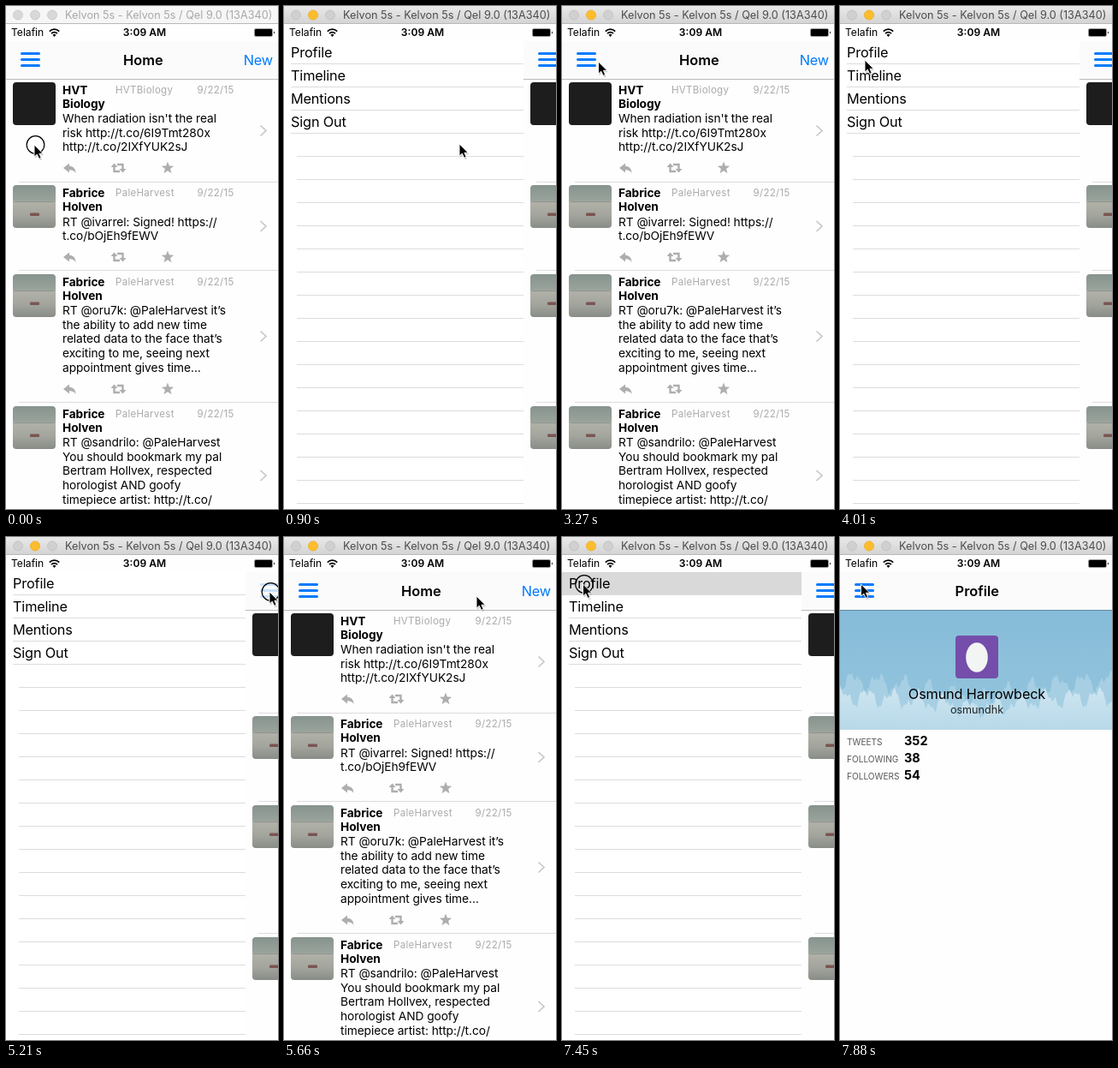
An HTML page for the animation above (8000 ms loop, 318 by 587 pixels).

```html
<!DOCTYPE html>
<html lang="en">
<head>
<meta charset="utf-8">
<title>Drawer menu demo</title>
<style>
html, body { margin: 0; height: 100%; overflow: hidden; background: #fff; }
svg { display: block; width: 100%; height: 100%; font-family: Inter, sans-serif; }
.window { font-size: 12.68px; }
.status { font-size: 12.1px; }
.large { font-size: 16.3px; letter-spacing: -.01em; }
.heading { font-size: 16.4px; font-weight: 600; }
.body { font-size: 13.75px; letter-spacing: -.005em; }
.name { font-size: 13.7px; font-weight: 700; letter-spacing: -.005em; }
.meta { font-size: 11.5px; letter-spacing: .025em; fill: #aaa; }
.handle { font-size: 12.6px; fill: #222; }
.label { font-size: 10.1px; fill: #555; }
.value { font-size: 14.5px; font-weight: 700; }
.rule { stroke: #dcdcdf; }
.bar { fill: url(#chrome); }
.window { fill: #4c4c4c; }
.dot { fill: #d0d0d0; stroke: #c4c4c4; }
.middle { fill: #fdbd2f; stroke: #f0b22c; }
.inactive .bar { fill: #f6f6f6; }
.inactive .window { fill: #a8a8a8; }
.inactive .dot { fill: #d8d8d8; stroke: #cdcdcd; }
</style>
</head>
<body>
<svg viewBox="0 0 318 587">
  <defs>
    <linearGradient id="chrome" x2="0" y2="1">
      <stop stop-color="#e9e9e9"/><stop offset="1" stop-color="#d3d3d3"/>
    </linearGradient>
    <linearGradient id="photoTone" x2="0" y2="1">
      <stop stop-color="#87938d"/><stop offset=".36" stop-color="#99a39c"/>
      <stop offset=".42" stop-color="#b0b0a7"/><stop offset=".7" stop-color="#a3a59d"/>
      <stop offset="1" stop-color="#888d87"/>
    </linearGradient>
    <linearGradient id="sky" x2="0" y2="1">
      <stop stop-color="#86bcd9"/><stop offset="1" stop-color="#95c5dd"/>
    </linearGradient>
    <linearGradient id="foam" x2="0" y2="1">
      <stop stop-color="#d0e6f1"/><stop offset="1" stop-color="#b7d9e9"/>
    </linearGradient>
    <g id="photo">
      <rect width="50" height="50" rx="4" fill="url(#photoTone)"/>
      <path d="M2 19.500H48" stroke="#868e86" stroke-opacity=".7"/>
      <rect x="20" y="32.500" width="11" height="3.500" rx="1" fill="#7a5552"/>
    </g>
    <rect id="tile" width="50" height="50" rx="4" fill="#1d1d1d"/>
    <g id="actions" fill="#aeaeae">
      <path d="M74-5.500 67 0l7 5.500V2.300c4 0 6 1 7.500 4C81.500 1 79-2 74-2.300z"/>
      <path d="M126.500-2V4H133M136.500 2V-4H130" fill="none" stroke="#aeaeae" stroke-width="2.400"/>
      <path d="M122.500-1h8l-4-4.500zM132.500 1h8l-4 4.500z"/>
      <path id="star"/>
    </g>
  </defs>

  <rect width="318" height="587" fill="#fff"/>
  <g id="menu"></g>
  <g id="panel">
    <rect y="41" width="318" height="546" fill="#fefefe"/>
    <g id="feed"></g>
    <g id="profile"></g>
    <rect y="41" width="318" height="44" fill="#fbfbfb"/>
    <path d="M0 85.500H318" stroke="#000" stroke-opacity=".27"/>
    <path id="burger" d="M18.500 55.500H38.500M18.500 62.500H38.500M18.500 69.500H38.500"
      stroke="#007aff" stroke-width="3" stroke-linecap="round"/>
    <text id="heading" class="heading" x="160.300" y="69" text-anchor="middle"></text>
    <text id="compose" class="large" x="312" y="69" text-anchor="end" fill="#007aff">New</text>
  </g>

  <g class="status">
    <rect y="21" width="318" height="20" fill="#fefefe"/>
    <text x="6" y="35.300">Telafin</text>
    <g fill="none" stroke="#000" stroke-width="1.700">
      <path d="M50.800 29.600a8 8 0 0 1 11.400 0M53 32.100a4.900 4.900 0 0 1 7 0"/>
    </g>
    <path d="M56.500 36l-2-2.300a3 3 0 0 1 4 0z"/>
    <text x="162" y="35.300" text-anchor="middle" font-weight="600">3:09 AM</text>
    <rect x="290.500" y="26.500" width="21" height="9" rx="1.500" fill="none" stroke="#000" stroke-opacity=".4"/>
    <rect x="291" y="27" width="20" height="8" rx="1"/>
    <path d="M313 29.500q2 1.500 0 3z"/>
  </g>
  <g id="frame">
    <rect class="bar" width="318" height="21"/>
    <path d="M0 20.500H318" stroke="#b9b9b9"/>
    <circle class="dot" cx="14" cy="10.500" r="5.500"/>
    <circle class="dot middle" cx="34" cy="10.500" r="5.500"/>
    <circle class="dot" cx="54" cy="10.500" r="5.500"/>
    <text class="window" x="69" y="15">Kelvon 5s - Kelvon 5s / Qel 9.0 (13A340)</text>
  </g>

  <g id="cursor">
    <circle id="ring" cx="1.500" r="10.300" fill="none" stroke="#000" stroke-width="1.200"/>
    <g transform="scale(.94)">
      <path d="M1 2V17L4.500 14 7 19.500 9.700 18.300 7.300 13H12z" opacity=".18"/>
      <path d="M0 0V15L3.500 11.900 6 17.400 8.700 16.200 6.300 10.900H11z" stroke="#fff"/>
    </g>
  </g>
</svg>

<script>
const $ = id => document.getElementById(id);
const text = (kind, x, y, value, extra = '') =>
  `<text class="${kind}" x="${x}" y="${y}" ${extra}>${value}</text>`;
const rule = (x, y, end = 318) => `<path class="rule" d="M${x} ${y}H${end}"/>`;

const star = Array.from({ length: 10 }, (_, i) => {
  const r = i % 2 ? 3.2 : 7.6, a = i * Math.PI / 5;
  return `${(189 + r * Math.sin(a)).toFixed(2)} ${(-r * Math.cos(a)).toFixed(2)}`;
});
$('star').setAttribute('d', `M${star.join('L')}z`);

// Drawer menu
const ROW = 27;
$('menu').innerHTML =
  `<rect id="selected" y="41" width="318" height="${ROW}" fill="#d9d9d9"/>` +
  Array.from({ length: 20 }, (_, i) => rule(i < 4 ? 8 : 15, 67.5 + i * ROW)).join('') +
  ['Profile', 'Timeline', 'Mentions', 'Sign Out']
    .map((label, i) => text('large', 8, 60 + i * ROW, label)).join('');

// Timeline
const posts = [
  { top: 85, mid: 145.5, art: 'tile', name: ['HVT', 'Biology'], handle: 'HVTBiology',
    lines: ["When radiation isn't the real", 'risk http://t.co/6I9Tmt280x', 'http://t.co/2IXfYUK2sJ'] },
  { top: 205.5, mid: 257, lines: ['RT @ivarrel: Signed! https://', 't.co/bOjEh9fEWV'] },
  { top: 309, mid: 385.5, lines: ['RT @oru7k: @PaleHarvest it’s', 'the ability to add new time',
    'related data to the face that’s', 'exciting to me, seeing next', 'appointment gives time…'] },
  { top: 463, mid: 548, lines: ['RT @sandrilo: @PaleHarvest', 'You should bookmark my pal',
    'Bertram Hollvex, respected', 'horologist AND goofy', 'timepiece artist: http://t.co/', 'and'] }
];

function drawPost({ top, mid, art = 'photo', name = ['Fabrice', 'Holven'], handle = 'PaleHarvest', lines }) {
  const y = Math.floor(top);
  const bodyY = i => Math.round(top + 51 + i * 16.7);
  return (top > 85 ? rule(15, Math.floor(top - .5) + .5) : '') +
    `<use href="#${art}" x="8" y="${y + 4}"/>` +
    name.map((part, i) => text('name', 66, y + 18 + i * 16, part)).join('') +
    text('meta', 128, y + 17, handle) +
    text('meta', 266.5, y + 17, '9/22/15', 'text-anchor="end"') +
    lines.map((line, i) => text('body', 66, bodyY(i), line)).join('') +
    `<use href="#actions" y="${bodyY(lines.length - 1) + 20}"/>` +
    `<path d="M297.500 ${mid - 6}l6.500 6-6.500 6" fill="none" stroke="#c7c7cc" stroke-width="1.700"/>`;
}
$('feed').innerHTML = posts.map(drawPost).join('');

// Profile page
function wave(base, swell, rough, phase) {
  let d = 'M0 225';
  for (let x = 0; x <= 318; x += 2) {
    const jag = Math.sin(x * .21 + phase) + .6 * Math.sin(x * .47 + phase * 2) + .35 * Math.sin(x * 1.1 + phase);
    const y = base - swell * Math.abs(Math.cos(Math.PI * x / 318)) - rough * jag;
    d += `L${x} ${y.toFixed(1)}`;
  }
  return d + 'L318 225z';
}
const stats = [['TWEETS', 352], ['FOLLOWING', 38], ['FOLLOWERS', 54]];
$('profile').innerHTML =
  '<rect y="85" width="318" height="140" fill="url(#sky)"/>' +
  `<path d="${wave(188, 20, 8, -1.6)}" fill="#a6cfe3"/>` +
  `<path d="${wave(200, 14, 8, 1.2)}" fill="url(#foam)"/>` +
  '<rect x="135" y="115" width="50" height="50" rx="4" fill="#744eaa"/>' +
  '<ellipse cx="160" cy="140.500" rx="12.800" ry="17.300" fill="#f3f5f4"/>' +
  text('large', 160, 189, 'Osmund Harrowbeck', 'text-anchor="middle"') +
  text('handle', 160, 206.3, 'osmundhk', 'text-anchor="middle"') +
  stats.map(([label, value], i) =>
    text('label', 8, 243 + i * 20, label) + text('value', 75, 243 + i * 20, value)).join('');

const LOOP = 8000, TICK = 148.7, OPEN = 280;
const slide = (start, from, to) =>
  [0, .82, .97, 1].map((p, i) => [start + i, Math.round(from + (to - from) * p)]);

const drawer = [
  [0, 0], [1, 8], [2, 48], [3, 103], [4, 150], [5, 245], [6, OPEN],
  [14, OPEN], [15, 269], [16, 160], [17, 25], [18, 0],
  ...slide(24, 0, OPEN), ...slide(35, OPEN, 0), ...slide(42, 0, OPEN), ...slide(50, OPEN, 0)
];
const pointer = [
  [0, 33, 162], [1, 45, 162], [2, 85, 162], [3, 140, 162], [4, 187, 161], [5, 205, 161], [9, 205, 161],
  [10, 215, 162], [12, 280, 168], [13, 296, 168], [14, 296, 168], [15, 285, 168], [16, 176, 168],
  [17, 50, 166], [18, 44, 160], [19, 44, 160], [21, 46, 95], [22, 42.5, 65], [23, 30, 63], [27, 29, 63],
  [28, 40, 63], [30, 150, 76], [31, 220, 78], [33, 300, 65], [35, 308, 64], [36, 308, 64],
  [37, 300, 64], [39, 150, 74], [41, 32, 65], [42, 27, 64], [46, 27, 64], [47, 26, 59], [48, 24.5, 55]
];
const presses = [[0, 4], [14, 17], [24, 24], [35, 35], [42, 42], [50, 50]];
const burgerTaps = [24, 35, 42];

function sample(track, tick) {
  const next = track.findIndex(key => key[0] > tick);
  if (next < 0) return track[track.length - 1].slice(1);
  const a = track[next - 1], b = track[next];
  const p = (tick - a[0]) / (b[0] - a[0]);
  return a.slice(1).map((v, i) => v + (b[i + 1] - v) * p);
}

function burgerOpacity(tick) {
  if (burgerTaps.includes(tick)) return .2;
  return burgerTaps.includes(tick - 1) ? .65 : 1;
}

const show = (id, on) => $(id).setAttribute('visibility', on ? 'visible' : 'hidden');

function render() {
  const tick = Math.min(53, Math.floor(performance.now() % LOOP / TICK + .08));
  const onProfile = tick > 50;
  $('panel').setAttribute('transform', `translate(${sample(drawer, tick)[0]})`);
  $('cursor').setAttribute('transform', `translate(${sample(pointer, tick).join()})`);
  $('burger').setAttribute('opacity', burgerOpacity(tick));
  $('frame').setAttribute('class', tick ? '' : 'inactive');
  $('heading').textContent = onProfile ? 'Profile' : 'Home';
  show('ring', presses.some(([from, to]) => tick >= from && tick <= to));
  show('selected', tick >= 50);
  show('profile', onProfile);
  show('feed', !onProfile);
  show('compose', !onProfile);
  requestAnimationFrame(render);
}
render();
</script>
</body>
</html>
```
